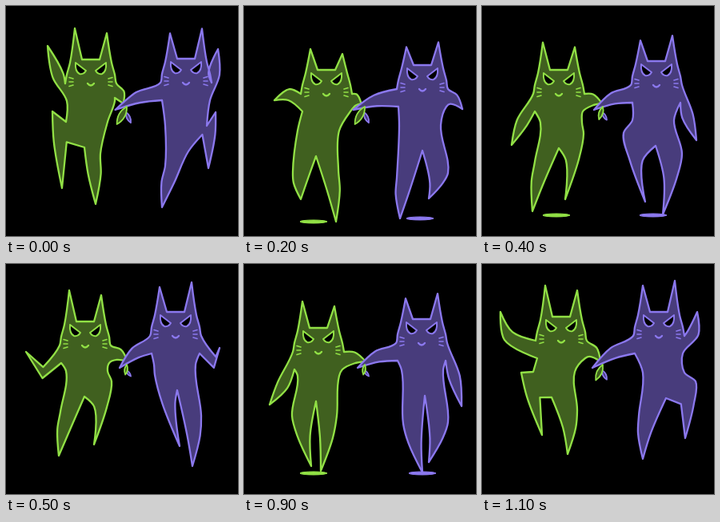
An HTML page with a canvas that plays this animation: 290x288 px, repeating every 1.2 s.

```html
<!DOCTYPE html>
<html lang="en">
<head>
<meta charset="utf-8">
<title>Dancing cats</title>
<style>
html, body { margin: 0; height: 100%; overflow: hidden; background: #000; }
canvas { display: block; }
</style>
</head>
<body>
<canvas id="stage" width="290" height="288"></canvas>
<script>
const ctx = document.getElementById('stage').getContext('2d');
const STEP = 100, STEPS = 12, AIRBORNE = 253;

// A pose is eight joints: brow, free elbow, free hand, crotch,
// then knee and foot on the free side, knee and foot on the held side
const pose = text => text.split(' ').map(pair => pair.split(',').map(Number));

const green = {
  line: '#91e045', fill: '#40601f', side: -1, paw: [150, 122],
  poses: {
    0: pose('106,67 65,87 52,50 98,177 58,132 70,228 118,185 112,248'),
    2: pose('103,80 56,111 38,118 90,188 61,208 71,242 118,205 115,270'),
    4: pose('96,80 50,146 37,174 96,178 66,195 63,257 127,160 104,242'),
    5: pose('99,72 46,136 25,110 98,166 68,185 66,240 132,147 110,226'),
    7: pose('96,77 44,138 18,131 92,168 62,180 72,254 125,155 94,235'),
    9: pose('93,80 48,152 32,176 90,172 60,190 84,253 116,190 96,259'),
    11: pose('99,66 33,90 23,60 87,167 49,136 75,214 119,183 107,238')
  }
};

const violet = {
  line: '#8b78ee', fill: '#483c7c', side: 1, paw: [140, 130],
  poses: {
    0: pose('225,66 260,85 265,54 228,182 262,133 253,203 199,200 195,252'),
    2: pose('223,74 262,117 273,129 223,181 255,209 231,241 191,215 195,266'),
    4: pose('218,69 257,138 268,168 217,175 250,185 226,261 177,159 204,245'),
    5: pose('212,60 261,123 267,105 214,158 244,190 233,253 186,139 217,228'),
    7: pose('213,60 266,99 275,74 223,160 245,190 236,259 184,136 208,235'),
    9: pose('222,69 263,142 272,178 226,165 255,198 231,248 199,200 223,261'),
    11: pose('221,60 264,86 269,60 230,168 267,147 254,218 196,190 201,244')
  }
};

const mix = ([ax, ay], [bx, by], k) => [ax + (bx - ax) * k, ay + (by - ay) * k];
const shift = ([x, y], dx, dy) => [x + dx, y + dy];

function poseAt({ poses }, step) {
  if (poses[step]) return poses[step];
  const before = poses[step - 1], after = poses[step + 1];
  return before.map((joint, i) => mix(joint, after[i], 0.5));
}

// One half of the body, from the ear down to the inner leg
function half(side, brow, earHeight, elbow, hand, crotch, hip, knee, foot) {
  const at = (dx, dy) => shift(brow, side * dx, dy);
  const shoulder = at(31, 41);
  elbow = elbow || shift(mix(shoulder, hand, 0.5), 0, -4);
  const dx = hand[0] - shoulder[0], dy = hand[1] - shoulder[1];
  const k = 7 * side / Math.hypot(dx, dy);
  const shin = mix(knee, foot, 0.4);
  return [
    at(11, 0), at(20, -earHeight), at(26, 4), at(30, 19), at(32, 30),
    shift(elbow, dy * k, -dx * k), hand, shift(elbow, -dy * k, dx * k),
    at(30, 52), shift(crotch, side * hip, -32),
    knee, shift(shin, side * 3, 0), foot, shift(shin, side * -13, 0), crotch
  ];
}

// Closed curve: smooth through gentle bends, sharp at tight corners
function outline(points) {
  const n = points.length;
  const tangents = points.map(([x, y], i) => {
    const [px, py] = points[(i + n - 1) % n], [qx, qy] = points[(i + 1) % n];
    const a = Math.hypot(x - px, y - py) || 1, b = Math.hypot(qx - x, qy - y) || 1;
    const ux = (x - px) / a, uy = (y - py) / a, vx = (qx - x) / b, vy = (qy - y) / b;
    return ux * vx + uy * vy > 0.5 ? [(ux + vx) / 2, (uy + vy) / 2] : [0, 0];
  });
  ctx.beginPath();
  ctx.moveTo(...points[0]);
  points.forEach(([x, y], i) => {
    const j = (i + 1) % n, [qx, qy] = points[j];
    const h = Math.hypot(qx - x, qy - y) / 3;
    ctx.bezierCurveTo(x + tangents[i][0] * h, y + tangents[i][1] * h,
      qx - tangents[j][0] * h, qy - tangents[j][1] * h, qx, qy);
  });
  ctx.closePath();
}

function paint(cat, width) {
  ctx.fillStyle = cat.fill;
  ctx.strokeStyle = cat.line;
  ctx.lineWidth = width;
  ctx.fill();
  ctx.stroke();
}

function drawFace([x, y]) {
  ctx.fillStyle = '#000';
  for (const side of [-1, 1]) {
    ctx.save();
    ctx.translate(x, y);
    ctx.scale(side, 1);
    ctx.beginPath();
    ctx.moveTo(19, 4);
    ctx.lineTo(6, 14);
    ctx.quadraticCurveTo(9, 19, 14, 18);
    ctx.quadraticCurveTo(20, 15, 19, 4);
    ctx.closePath();
    ctx.fill();
    ctx.lineWidth = 2;
    ctx.stroke();
    ctx.lineWidth = 1.6;
    ctx.beginPath();
    for (const k of [-1, 0, 1]) {
      ctx.moveTo(22, 28 + k * 4);
      ctx.lineTo(27, 28 + k * 5.5);
    }
    ctx.stroke();
    ctx.restore();
  }
  ctx.beginPath();
  ctx.moveTo(x - 4, y + 30);
  ctx.quadraticCurveTo(x, y + 35, x + 4, y + 30);
  ctx.stroke();
}

function drawCat(cat, step, swing) {
  const [brow, elbow, hand, crotch, knee, foot, heldKnee, heldFoot] = poseAt(cat, step);
  const paw = shift(cat.paw, -4 * swing, 0);
  const ground = Math.max(foot[1], heldFoot[1]);

  if (ground > AIRBORNE) {
    ctx.beginPath();
    ctx.ellipse(crotch[0] - 3, Math.max(262, ground), 17, 2, 0, 0, Math.PI * 2);
    paint({ ...cat, fill: cat.line }, 1);
  }

  // Ears flatten on landing
  const ears = 36 - 0.65 * Math.max(0, ground - 250);
  const free = half(cat.side, brow, ears + 3, elbow, hand, crotch, 23, knee, foot);
  const held = half(-cat.side, brow, ears - 3, null, paw, crotch, 29, heldKnee, heldFoot);
  outline([...held, ...free.reverse().slice(1)]);
  paint(cat, 2.3);
  drawFace(brow);
}

function drawPawTip(cat, x, y, dx, dy) {
  const wx = dy * 0.3, wy = -dx * 0.3;
  ctx.beginPath();
  ctx.moveTo(x, y);
  ctx.quadraticCurveTo(x + dx / 2 + wx, y + dy / 2 + wy, x + dx, y + dy);
  ctx.quadraticCurveTo(x + dx / 2 - wx, y + dy / 2 - wy, x, y);
  ctx.closePath();
  paint(cat, 1.8);
}

function draw(now) {
  const step = Math.floor(now / STEP) % STEPS;
  const swing = Math.cos((step - 1) / STEPS * Math.PI * 2);
  const reach = 16 + 7 * swing;
  ctx.fillStyle = '#000';
  ctx.fillRect(0, 0, 290, 288);
  drawCat(green, step, swing);
  drawCat(violet, step, swing);
  drawPawTip(violet, 150, 133, 6, reach * 0.6);
  drawPawTip(green, 151, 126, -reach * 0.3 * (1 + swing), reach);
}

ctx.lineJoin = ctx.lineCap = 'round';
const start = performance.now();
function tick() {
  draw(performance.now() - start);
  requestAnimationFrame(tick);
}
tick();
</script>
</body>
</html>
```
